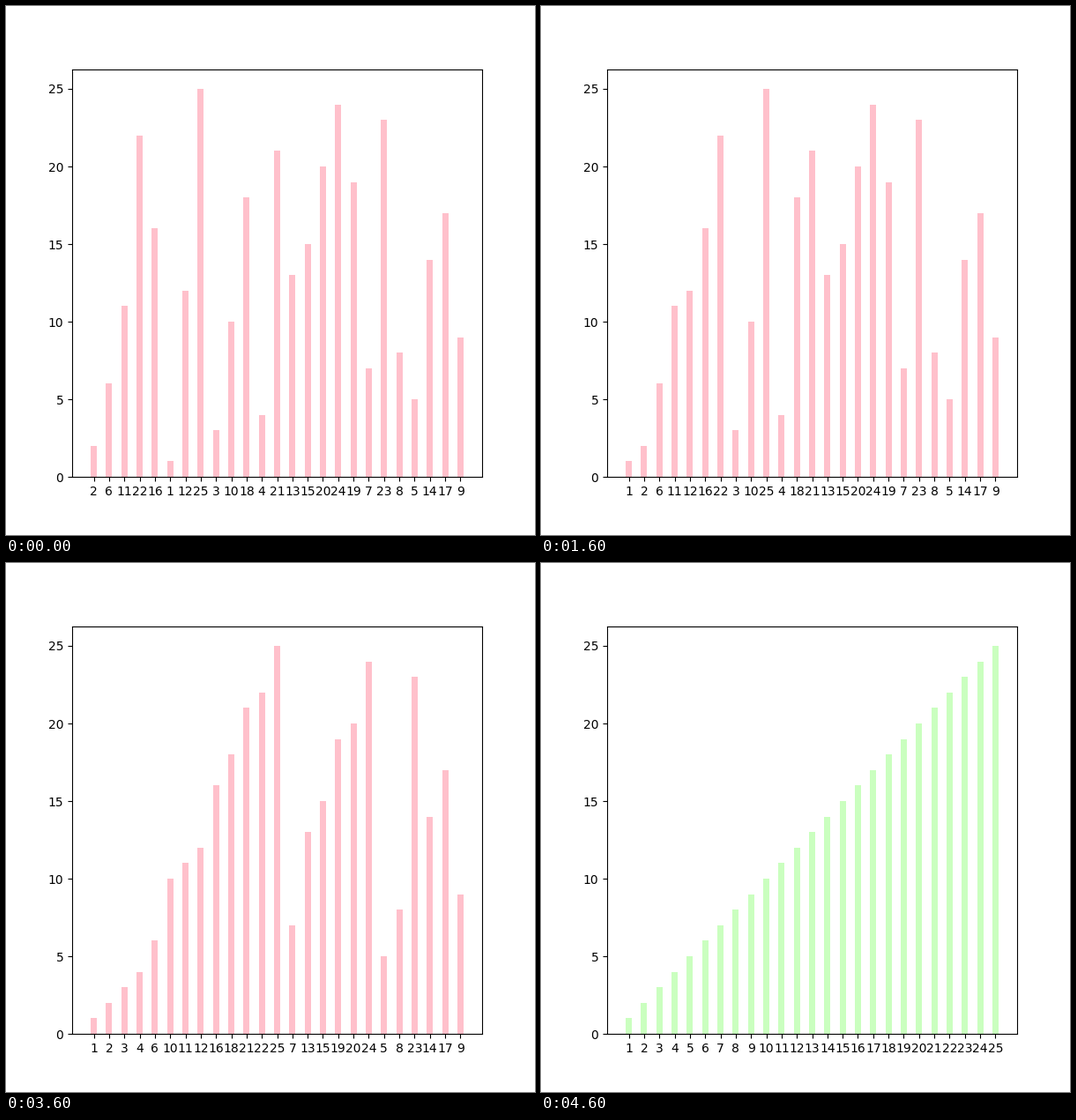
Animation of 600 by 600 pixels, one loop 5800 ms. Source, as a matplotlib script:

```python
import matplotlib.pyplot as plt
from matplotlib.animation import FuncAnimation

# The unsorted input; every later state follows from the sort itself.
VALUES = [2, 6, 11, 22, 16, 1, 12, 25, 3, 10, 18, 4, 21,
          13, 15, 20, 24, 19, 7, 23, 8, 5, 14, 17, 9]
STEP_MS = 200
HOLD = 5  # extra steps on the sorted result
BUSY, DONE = "pink", "#caffbf"


def merge_sort(a, lo, hi):
    """Sort a[lo..hi] in place, yielding a copy after every merge."""
    if lo >= hi:
        return
    mid = (lo + hi) // 2
    yield from merge_sort(a, lo, mid)
    yield from merge_sort(a, mid + 1, hi)
    a[lo:hi + 1] = sorted(a[lo:hi + 1])
    yield a[:]


steps = list(merge_sort(VALUES[:], 0, len(VALUES) - 1))
last = len(steps) - 1

fig, ax = plt.subplots(figsize=(6, 6), dpi=100)
bars = ax.bar(range(len(VALUES)), VALUES, width=0.4, color=BUSY)
ax.set_xticks(range(len(VALUES)))


def draw(i):
    state = steps[min(i, last)]
    color = DONE if i >= last else BUSY
    for bar, value in zip(bars, state):
        bar.set_height(value)
        bar.set_facecolor(color)
    ax.set_xticklabels([str(v) for v in state])
    return bars.patches


anim = FuncAnimation(fig, draw, frames=len(steps) + HOLD, interval=STEP_MS,
                     init_func=lambda: draw(0), repeat=True, repeat_delay=0)
plt.show()
```
